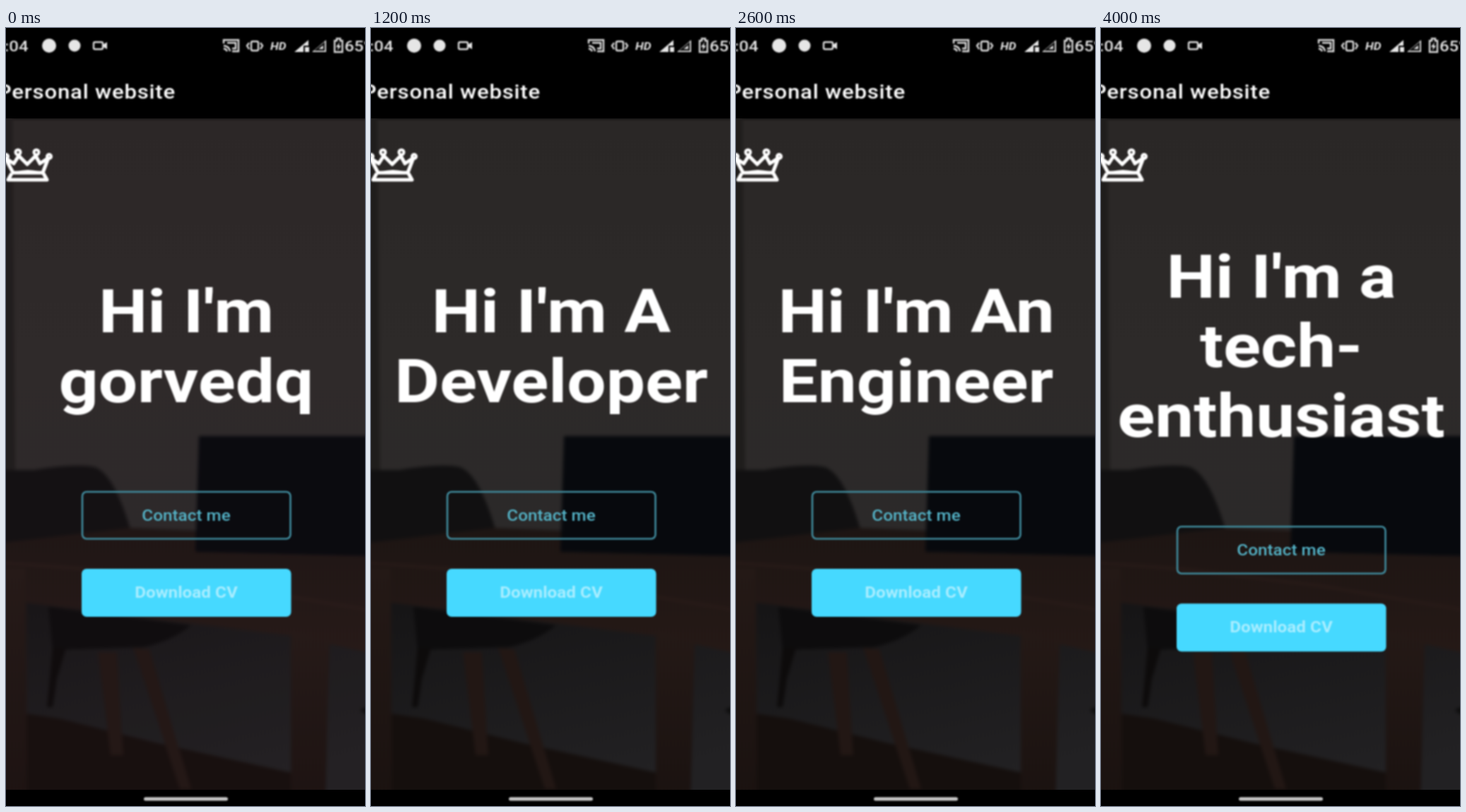
Recreate the animation shown at these times as an HTML page. Size 508 by 1102 pixels, loop 4.1 s.

```html
<!DOCTYPE html>
<html lang="en">
<head>
<meta charset="utf-8">
<title>Personal website</title>
<style>
  html, body { margin: 0; width: 100%; height: 100%; overflow: hidden; background: #000; }
  svg { display: block; width: 100%; height: 100%; }
  text { font-family: Roboto, Arial, sans-serif; font-weight: 500; fill: #fff; }
  filter { color-interpolation-filters: sRGB; }
  #heading text { font-size: 86px; font-weight: 700; text-anchor: middle; }
  .label { font-size: 21.3px; text-anchor: middle; }
  .line { fill: none; stroke: #dcdcdc; stroke-width: 2.4; }
  .solid { fill: #e6e6e6; }
</style>
</head>
<body>
<svg viewBox="0 0 508 1102" preserveAspectRatio="none">
  <defs>
    <filter id="soft" x="-5%" y="-5%" width="110%" height="110%"><feGaussianBlur stdDeviation="2.5"/></filter>
    <filter id="crisp" x="-5%" y="-5%" width="110%" height="110%"><feGaussianBlur stdDeviation=".9"/></filter>
    <clipPath id="page"><rect y="128" width="508" height="951"/></clipPath>
    <linearGradient id="wall" x1="0" y1="0" x2="0" y2="1">
      <stop offset="0" stop-color="#2a2726"/>
      <stop offset=".35" stop-color="#2d2a29"/>
      <stop offset="1" stop-color="#282729"/>
    </linearGradient>
    <linearGradient id="shade" x1="0" y1="0" x2=".4" y2="1">
      <stop offset="0" stop-color="#151415"/>
      <stop offset="1" stop-color="#222123"/>
    </linearGradient>
    <linearGradient id="wood" x1="0" y1="0" x2="0" y2="1">
      <stop offset="0" stop-color="#1d1513"/>
      <stop offset="1" stop-color="#251916"/>
    </linearGradient>
    <linearGradient id="leg" x1="0" y1="0" x2="0" y2="1">
      <stop offset="0" stop-color="#241916"/>
      <stop offset="1" stop-color="#1a1210"/>
    </linearGradient>
  </defs>
  <rect width="508" height="1102"/>

  <!-- Dimmed room -->
  <g clip-path="url(#page)">
    <g filter="url(#soft)">
      <rect x="-10" y="128" width="528" height="980" fill="url(#wall)"/>
      <path d="M-10 120H9L13 640H-10Z" fill="#1f1d1c"/>
      <path d="M-10 626H40Q100 616 126 622Q158 634 184 740H-10Z" fill="#111011"/>
      <path d="M20 800H518V1100H20Z" fill="url(#shade)"/>
      <path d="M20 970L75 978L215 1013L410 1056V1100H20Z" fill="#150f0d"/>
      <path d="M60 820L262 846Q235 868 195 877L66 881Z" fill="#0d0c0d"/>
      <path d="M66 878H85L72 922L66 962H58Z" fill="#0d0b0b"/>
      <path d="M130 884H157L166 1030H148Z" fill="#221714"/>
      <path d="M180 878L203 880L262 1078H246Z" fill="#221714"/>
      <path d="M-10 730L175 708L275 712V742L518 748V886L403 861L140 828L30 814L-10 810Z" fill="url(#wood)"/>
      <path d="M-10 757L110 766L310 790L518 825" fill="none" stroke="#2a1c19" stroke-width="3"/>
      <path d="M-10 765H28L30 1100H-10Z" fill="url(#leg)"/>
      <path d="M403 855L458 868L452 1100H403Z" fill="url(#leg)"/>
      <path d="M273 578H518V748L268 742Z" fill="#07090d"/>
      <path d="M500 966L512 961V974Z" fill="#0c0c0c"/>
    </g>
    <rect id="tint" y="128" width="508" height="951" fill="#5a2838"/>
  </g>

  <g filter="url(#crisp)">
    <!-- Status bar -->
    <g id="status">
      <circle class="solid" cx="61" cy="25" r="10"/>
      <circle class="solid" cx="97" cy="25" r="8.5"/>
      <rect class="line" x="124" y="20" width="13" height="10" rx="2"/>
      <path class="solid" d="M138 23L143 20V30L138 27Z"/>
      <path class="line" d="M308 22V17H329V33H320M308 25Q316 26 317 33M308 29Q312 30 313 33M313 21H325V29H320"/>
      <rect class="line" x="347" y="19" width="10" height="13" rx="2"/>
      <path class="line" d="M344 21L341 25L344 30M360 21L363 25L360 30"/>
      <path class="solid" d="M408 34L428 17V25H421V34ZM423 27H429V34H423ZM433 34L453 17V34Z"/>
      <path class="line" d="M439 31H450V22Z" style="stroke:#111"/>
      <path class="line" d="M465 18H468V15H473V18H476V34H465Z"/>
      <path class="solid" d="M472 20L467 27H470L469 32L474 25H471Z"/>
    </g>

    <!-- Crown -->
    <g fill="none" stroke="#fff" stroke-width="5" stroke-linejoin="round">
      <path d="M-1 184L10 205H52L60 184L48 192L42 181L30 193L18 181L11 192Z"/>
      <path d="M8 206L3 215H58L53 206"/>
      <path d="M14 205Q31 200 48 205" stroke-width="3"/>
      <g stroke-width="4">
        <circle cx="0" cy="182" r="3"/><circle cx="17" cy="176" r="3.5"/>
        <circle cx="43" cy="176" r="3.5"/><circle cx="61" cy="182" r="3"/>
      </g>
    </g>

    <g id="buttons">
      <rect x="108" y="657" width="294.5" height="66.5" rx="6" fill="none" stroke="#408b9d" stroke-width="2.6"/>
      <rect x="107" y="766" width="296.5" height="68" rx="7" fill="#46d9ff"/>
    </g>
    <rect x="195" y="1089.5" width="119" height="5" rx="2.5" fill="#c8c8c8"/>
    <g id="captions"></g>
    <g id="heading"></g>
  </g>
</svg>
<script>
  const LOOP = 4100;
  const ASPECT = 1.14; // the screen is shown slightly widened
  const LINE = 98.5;
  const slides = [
    { at: 0, lines: ["Hi I'm", "gorvedq"] },
    { at: 700, lines: ["Hi I'm A", "Developer"] },
    { at: 2000, lines: ["Hi I'm An", "Engineer"] },
    { at: 3300, lines: ["Hi I'm a", "tech-", "enthusiast"] }
  ];
  const byId = id => document.getElementById(id);

  function addText(parent, content, x, y, attrs = {}) {
    const node = document.createElementNS("http://www.w3.org/2000/svg", "text");
    node.setAttribute("transform", `translate(${x} ${y}) scale(${ASPECT} 1)`);
    for (const [key, value] of Object.entries(attrs)) node.setAttribute(key, value);
    node.textContent = content;
    parent.append(node);
  }

  const status = byId("status");
  addText(status, ":04", -2, 33, { style: "font-size:21px;fill:#e6e6e6" });
  addText(status, "HD", 374, 31, { style: "font-size:15px;font-weight:700;font-style:italic;fill:#e6e6e6" });
  addText(status, "65%", 479, 33, { style: "font-size:21px;fill:#e6e6e6" });
  addText(byId("captions"), "Personal website", 240, 100,
    { style: "font-size:27.3px;letter-spacing:.7px;text-anchor:end" });
  addText(byId("buttons"), "Contact me", 255, 698, { class: "label", style: "fill:#55b5c9" });
  addText(byId("buttons"), "Download CV", 255, 807, { class: "label", style: "fill:#a9edff;font-weight:700" });

  let shown = null;
  function showSlide(slide) {
    if (slide === shown) return;
    shown = slide;
    const heading = byId("heading");
    const shift = (slide.lines.length - 2) * LINE / 2;
    heading.replaceChildren();
    slide.lines.forEach((line, i) => addText(heading, line, 255, 431 - shift + i * LINE));
    byId("buttons").setAttribute("transform", `translate(0 ${shift})`);
  }

  function render(time) {
    const t = time % LOOP;
    showSlide(slides.findLast(slide => slide.at <= t));
    byId("tint").setAttribute("opacity", 0.05 * Math.max(0, 1 - t / 600));
  }

  const start = performance.now();
  function tick() {
    render(performance.now() - start);
    requestAnimationFrame(tick);
  }
  tick();
</script>
</body>
</html>
```
